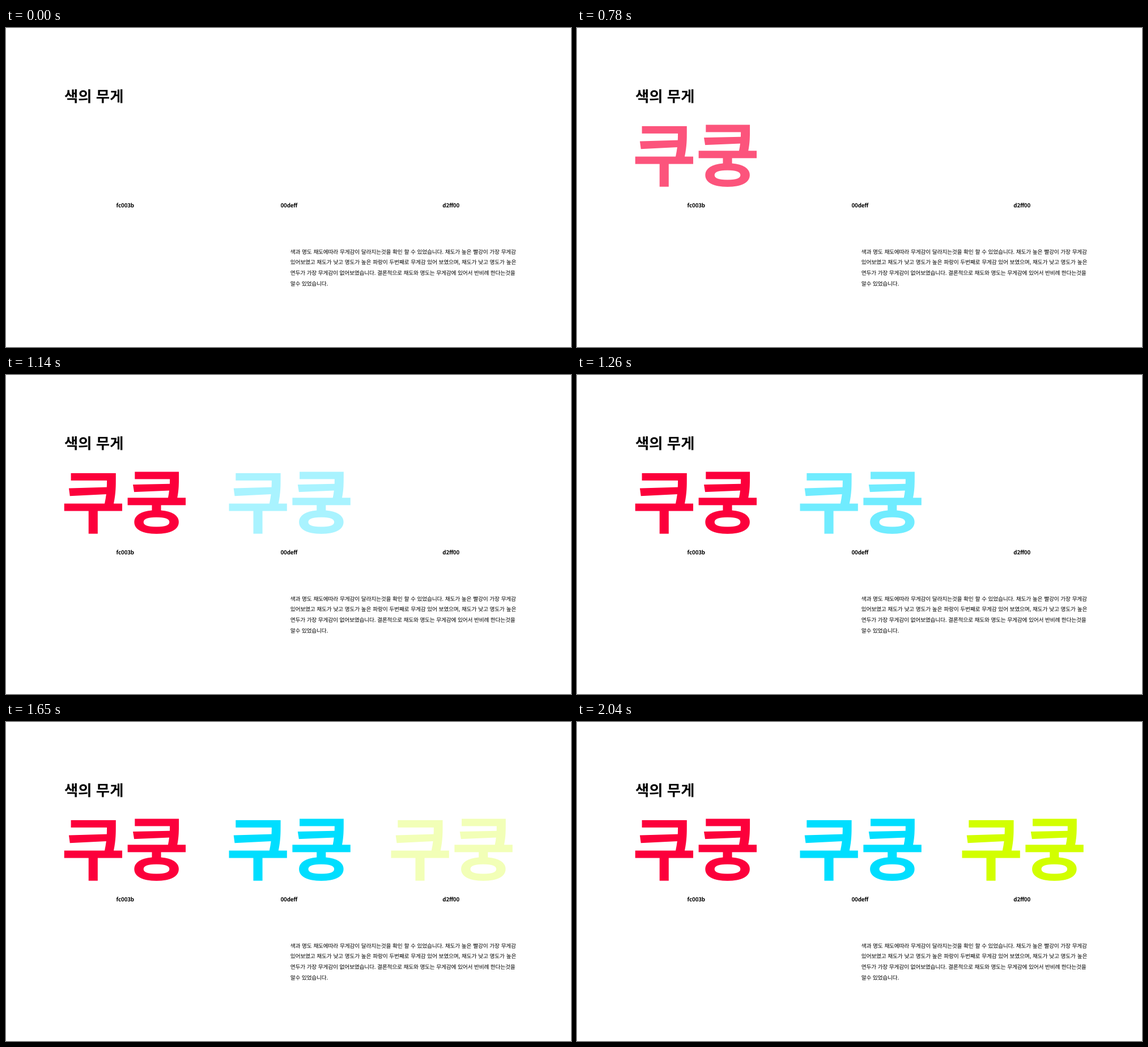
Write an HTML page that moves like this. It is 997 by 562 pixels and loops after 5.25 s.

```html
<!DOCTYPE html>
<html lang="ko">
<head>
<meta charset="utf-8">
<title>색의 무게</title>
<style>
  html, body { margin: 0; width: 100%; height: 100%; overflow: hidden; background: #fff; }
  svg { display: block; width: 997px; height: 562px; }
  text {
    font-family: "Noto Sans CJK KR", "Noto Sans KR", "Noto Sans CJK", sans-serif;
    font-size: 1000px;
    text-rendering: geometricPrecision;
  }
</style>
</head>
<body>
<svg id="stage" viewBox="0 0 997 562"></svg>
<script>
const LOOP = 5250, TICK = 30, FADE_TICKS = 18;
const EM = 1000;  // text is laid out at this size and scaled down, so advances stay unrounded
const FAMILY = '"Noto Sans CJK KR", "Noto Sans KR", "Noto Sans CJK", sans-serif';
const stage = document.getElementById('stage');
const pen = document.createElement('canvas').getContext('2d');

// Ink extents of a string at the given size, relative to its origin.
function ink(str, size, weight) {
  pen.font = `${weight} ${EM}px ${FAMILY}`;
  const m = pen.measureText(str), k = size / EM;
  return {
    left: -m.actualBoundingBoxLeft * k,
    right: m.actualBoundingBoxRight * k,
    bottom: m.actualBoundingBoxDescent * k
  };
}

function addText(str, x, y, size, weight, fill) {
  const el = document.createElementNS('http://www.w3.org/2000/svg', 'text');
  el.textContent = str;
  el.setAttribute('transform', `translate(${x} ${y}) scale(${size / EM})`);
  el.setAttribute('fill', fill);
  el.style.fontWeight = weight;
  stage.append(el);
  return el;
}

function addCentered(str, cx, y, size, fill) {
  const box = ink(str, size, 700);
  return addText(str, cx - (box.left + box.right) / 2, y, size, 700, fill);
}

const title = ink('색의 무게', 26.4, 700);
addText('색의 무게', 103.3 - title.left, 132.4 - title.bottom, 26.4, 700, '#000');

// start: first visible step; held: ticks that repeat the step before them
const words = [
  { hex: 'fc003b', cx: 209.8, labelX: 210.2, start: 480, end: 960, held: [510, 810] },
  { hex: '00deff', cx: 500.6, labelX: 499.7, start: 1020, end: 1470, held: [1170, 1440] },
  { hex: 'd2ff00', cx: 786.6, labelX: 785.2, start: 1560, end: 2040, held: [] }
];
const big = ink('쿠쿵', 121.6, 700);
for (const w of words) {
  w.el = addCentered('쿠쿵', w.cx, 280 - big.bottom, 121.6, '#' + w.hex);
  addCentered(w.hex, w.labelX, 315.6, 9.5, '#000');
}

const lines = [
  '색과 명도 채도에따라 무게감이 달라지는것을 확인 할 수 있었습니다. 채도가 높은 빨강이 가장 무게감',
  '있어보였고 채도가 낮고 명도가 높은 파랑이 두번째로 무게감 있어 보였으며, 채도가 낮고 명도가 높은',
  '연두가 가장 무게감이 없어보였습니다. 결론적으로 채도와 명도는 무게감에 있어서 반비례 한다는것을',
  '알수 있었습니다.'
];
const column = { x: 501.7, width: 390.5, y: 397.7, leading: 18.73, size: 9.5 };
lines.forEach((line, i) => {
  const box = ink(line, column.size, 400);
  const el = addText(line, column.x, column.y + i * column.leading, column.size, 400, '#000');
  if (i < lines.length - 1) {
    const gaps = line.split(' ').length - 1;
    const extra = (column.width - box.right + box.left) / gaps;
    el.style.wordSpacing = extra * EM / column.size + 'px';
  }
});

function opacityAt(w, t) {
  if (t < w.start) return 0;
  if (t >= w.end) return 1;
  let tick = Math.floor(t / TICK) * TICK;
  if (w.held.includes(tick)) tick -= TICK;
  return ((tick - w.start) / TICK + 2) / FADE_TICKS;
}

function draw() {
  const t = performance.now() % LOOP;
  for (const w of words) w.el.setAttribute('opacity', opacityAt(w, t));
  requestAnimationFrame(draw);
}
draw();
</script>
</body>
</html>
```
